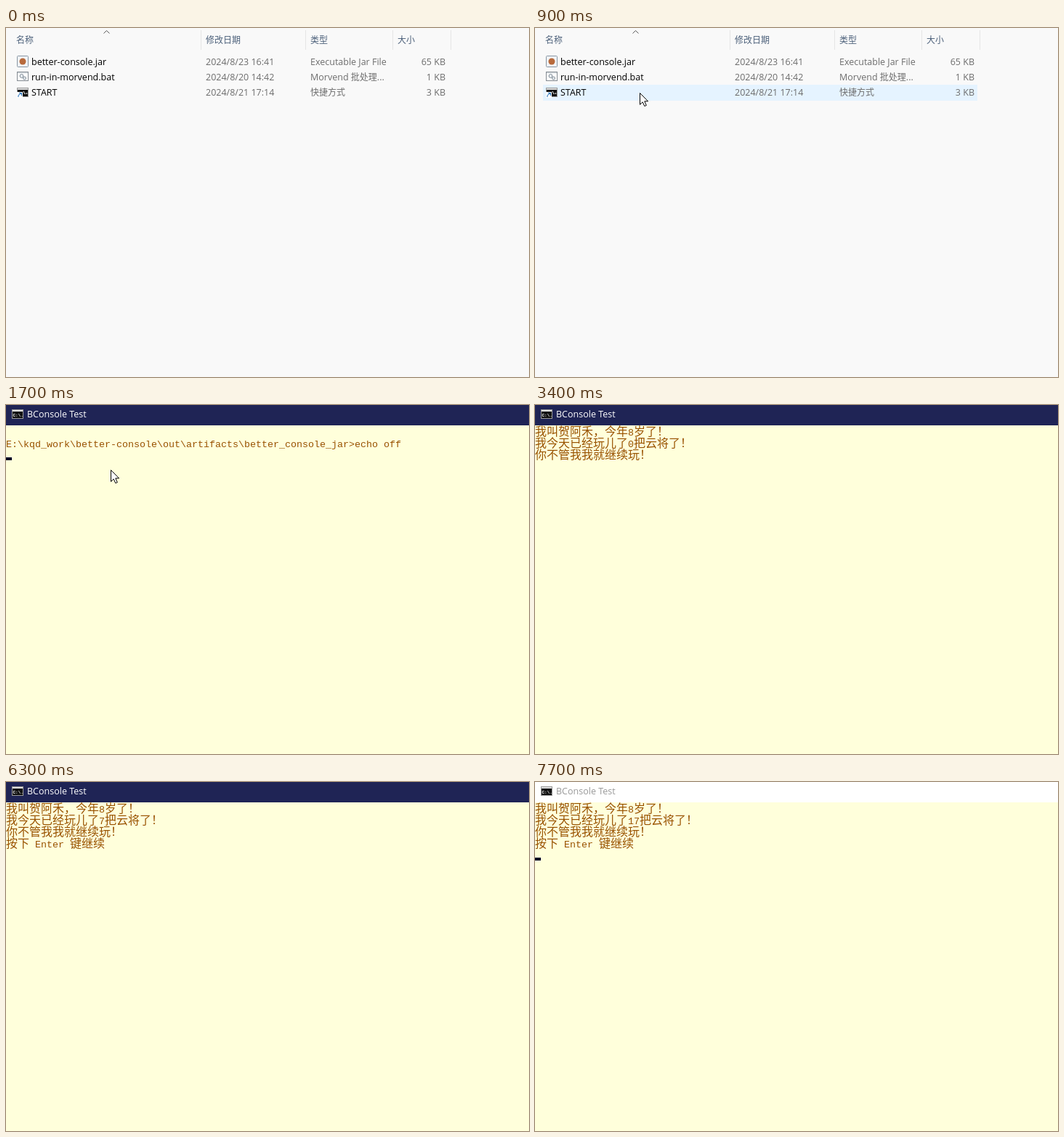
An HTML page that plays this animation: 720x480 px, repeating every 8 s.

```html
<!DOCTYPE html>
<html lang="zh-CN">
<head>
<meta charset="utf-8">
<style>
html, body { margin: 0; width: 100%; height: 100%; overflow: hidden; background: #f9f9f9; }
svg { display: block; }
text { white-space: pre; }
.ui { font: 12.5px "Open Sans", sans-serif; }
.ui .han { font: 12px "Noto Sans CJK SC", "Noto Sans CJK", sans-serif; }
.term { font: 13.33px "Liberation Mono", monospace; fill: #995200; }
.term .han { font: 300 16px "Noto Sans CJK SC", "Noto Sans CJK", sans-serif; }
.tiny { font: bold 6px "Liberation Mono", monospace; fill: #fff; }
</style>
</head>
<body>
<svg id="stage" width="720" height="480" viewBox="0 0 720 480"></svg>
<script>
const stage = document.getElementById('stage');
const LOOP = 8000, STEP = 100;

const rect = (x, y, w, h, fill, extra = '') =>
  `<rect x="${x}" y="${y}" width="${w}" height="${h}" fill="${fill}" ${extra}/>`;
const path = (d, stroke, extra = 'fill="none"') => `<path d="${d}" stroke="${stroke}" ${extra}/>`;

// Latin and Chinese runs use different fonts
const text = (x, y, str, cls, extra = '') => {
  const runs = str.match(/[ -~]+|[^ -~]+/g).map(run =>
    /[ -~]/.test(run) ? run : `<tspan class="han">${run}</tspan>`).join('');
  return `<text x="${x}" y="${y}" class="${cls}" ${extra}>${runs}</text>`;
};
const ui = (x, y, str, fill, extra = '') => text(x, y, str, 'ui', `fill="${fill}" ${extra}`);

// Last value whose start time has been reached
const at = (keys, t) => keys.reduce((value, [start, v]) => t >= start ? v : value, keys[0][1]);

const termIcon = (x, y) =>
  rect(x, y, 16, 13, '#111') + rect(x + .5, y + .5, 15, 12, 'none', 'stroke="#999"') +
  rect(x + 1, y + 1, 14, 2, '#ddd');

const icons =
  rect(15.5, 38.5, 15, 15, '#f1f4f7', 'rx="1" stroke="#8795a3"') +
  '<circle cx="23" cy="46" r="4.5" fill="#b86a3c"/>' +
  rect(15.5, 60.5, 15, 12, '#fff', 'stroke="#848b92"') + rect(16, 61, 14, 1.5, '#d5dbe0') +
  '<g fill="#e9eef2" stroke="#7f8b96"><circle cx="21.5" cy="66" r="2.4"/><circle cx="25.5" cy="69" r="2"/></g>' +
  termIcon(15, 82) + path('M24 87l2 4M27 90h2.5', '#fff') +
  rect(15, 88, 8, 8, '#fff') + path('M17 95V92.5L21 90M18 89.5h3.5v3.5', '#1768b5');

const files = [
  ['better-console.jar', '2024/8/23 16:41', 'Executable Jar File', '65 KB'],
  ['run-in-morvend.bat', '2024/8/20 14:42', 'Morvend 批处理...', '1 KB'],
  ['START', '2024/8/21 17:14', '快捷方式', '3 KB'],
];
const headings = [[14, '名称'], [275, '修改日期'], [419, '类型'], [539, '大小']];

const fileList = headings.map(([x, s]) => ui(x, 21, s, '#4c607a')).join('') +
  [268, 412, 532, 612].map(x => rect(x, 3, 1, 27, '#e5e5e5')).join('') +
  path('M134.5 7.5L138.5 3.5L142.5 7.5', '#5a5a5a') + icons +
  files.map(([name, date, type, size], i) => {
    const y = 51 + 21 * i, grey = '#6d6d6d';
    return ui(35, y, name, '#000') + ui(275, y, date, grey) + ui(419, y, type, grey) +
      ui(605, y, size, grey, 'text-anchor="end"');
  }).join('');

function highlight(t) {
  if (t >= 1300) return rect(11.5, 78.5, 597, 21, '#cce8ff', 'stroke="#99d1ff"');
  if (t >= 600) return rect(11, 78, 598, 22, '#e5f3ff');
  return t >= 300 ? rect(11, 57, 598, 22, '#e5f3ff') : '';
}

const counts = [[1800, 0], [3800, 2], [4700, 4], [5700, 7], [6700, 12], [7600, 17]];
const clears = [3700, 6600, 7500];
const blinks = [[2500, 2800], [3400, 3800], [4400, 4700], [5400, 5700], [6300, 6700], [7300, 7600]];

function consoleLines(t) {
  if (t < 1800) return ['', String.raw`E:\kqd_work\better-console\out\artifacts\better_console_jar>echo off`];
  if (clears.includes(t)) return [];
  const lines = ['我叫贺阿禾，今年8岁了！', `我今天已经玩儿了${at(counts, t)}把云将了！`, '你不管我我就继续玩！'];
  return t < 3700 ? lines : [...lines, '按下 Enter 键继续'];
}

function terminal(t) {
  const open = Math.min(1, .45 + (t - 1500) / STEP * .45), left = 1 - open;
  const focused = t < 7700;
  const cursorOn = !blinks.some(([off, on]) => t >= off && t < on);
  return `<g opacity="${open}" transform="translate(${22 * left} ${12.4 * left}) scale(${1 - .045 * left})">` +
    rect(-1, -2, 1, 530, '#27348b') + rect(0, 0, 760, 520, '#ffffdb') +
    rect(0, -2, 760, 30, focused ? '#1f2455' : '#fff') +
    termIcon(8, 6) + '<text x="9.5" y="16" class="tiny">C:\\.</text>' +
    ui(29, 17, 'BConsole Test', focused ? '#fff' : '#999') +
    consoleLines(t).map((s, i) => s && text(0, 42 + 16 * i, s, 'term')).join('') +
    (cursorOn ? rect(0, t < 1800 ? 72 : 104, 8, 4, '#000024') : '') + '</g>';
}

const pointerPath = [
  [200, [704, 42]], [300, [520, 58]], [400, [340, 60]], [500, [223, 63]], [600, [188, 80]],
  [700, [164, 95]], [800, [150, 99]], [900, [144, 89]],
  [2500, [112, 92]], [2600, [62, 97]], [2700, [8, 102]],
];
function pointer(t) {
  if (t < 200 || t >= 2800) return '';
  const [x, y] = at(pointerPath, t);
  return path('M.5 .5V16.3L4.2 12.8L6.8 18.5L9.3 17.4L6.8 11.8H11.6Z', '#000',
    `fill="#fff" transform="translate(${x} ${y})"`);
}

function scene(t) {
  const list = t < 1700 ? rect(0, 0, 720, 480, '#f9f9f9') + highlight(t) + fileList : '';
  return list + (t >= 1500 ? terminal(t) : '') + pointer(t);
}

let shown = -1;
function tick() {
  const t = Math.floor(performance.now() % LOOP / STEP) * STEP;
  if (t !== shown) stage.innerHTML = scene(shown = t);
  requestAnimationFrame(tick);
}
tick();
</script>
</body>
</html>
```
